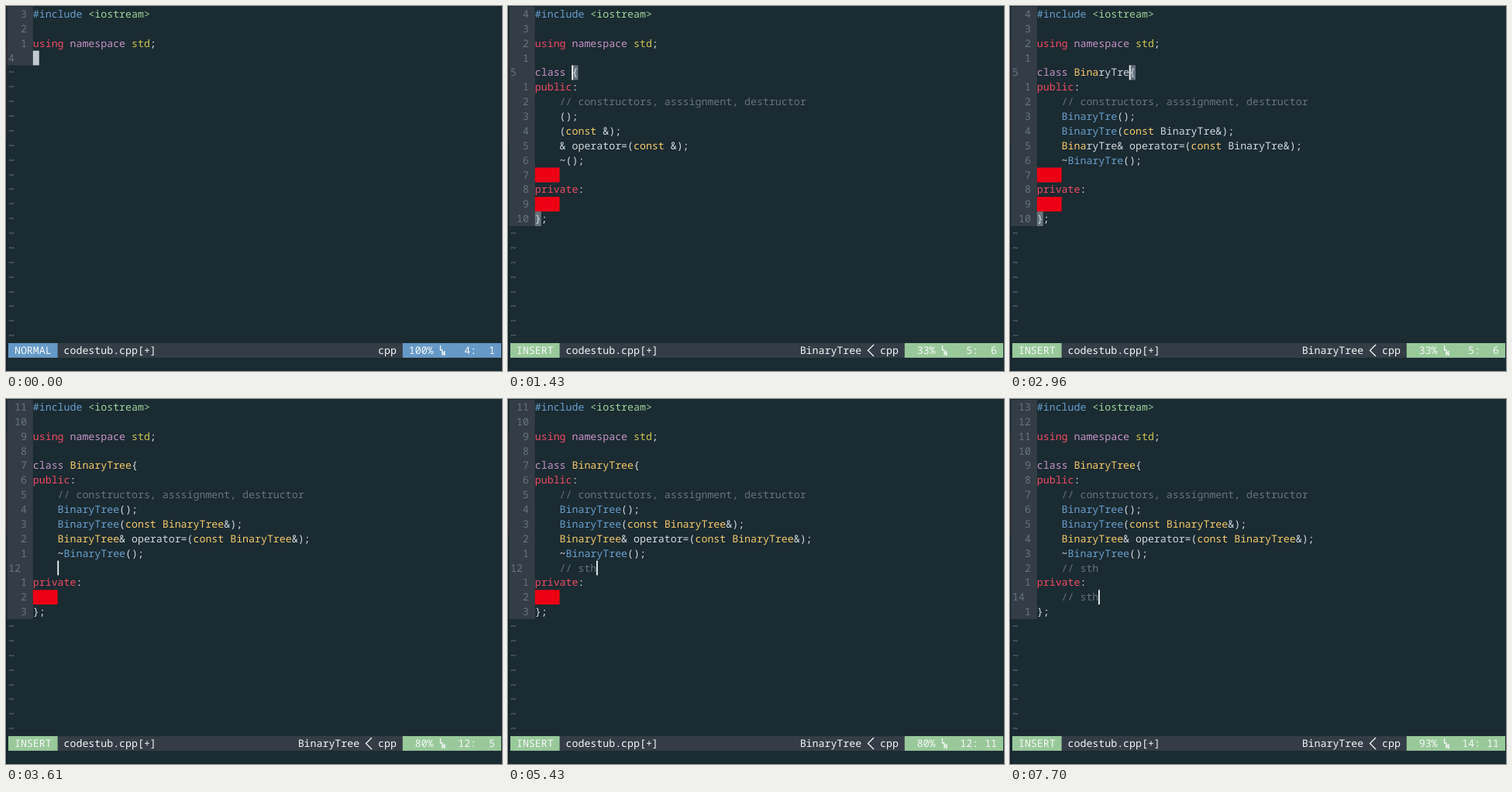
Animation of 640x471 px, one loop 7.75 s. Source, as an HTML page:

```html
<!DOCTYPE html>
<html lang="en">
<head>
<meta charset="utf-8">
<title>Snippet demo</title>
<style>
  html, body { margin: 0; width: 100%; height: 100%; overflow: hidden; background: #1b2b32; }
  svg { display: block; width: 640px; height: 471px; }
  text {
    font: 500 13.25px "Noto Sans Mono", "DejaVu Sans Mono", monospace;
    white-space: pre;
    text-rendering: geometricPrecision;
  }
</style>
</head>
<body>
<svg id="stage" viewBox="0 0 640 471"></svg>
<script>
const LOOP = 7750;
const COL = 7.95, ROW = 18.87, LEFT = 3, TOP = 1;
const GUTTER = 4, STATUS_ROW = 23;

const C = {
  bg: '#1b2b32', panel: '#343d46', dim: '#65737e', text: '#d3d9e0', white: '#f4f7f8',
  red: '#ee4b62', purple: '#c594c5', blue: '#6a9fcc', green: '#9fd39b',
  olive: '#cfc653', yellow: '#f6ca6c', alert: '#ee0014',
  normal: '#6699c6', insert: '#99c99a', cursor: '#c3c9cf'
};

// [time, phase, typed text]
const STEPS = [
  [0, 'normal', ''],
  [320, 'word', ''], [560, 'word', 'c'], [720, 'word', 'cl'],
  [910, 'word', 'cla'], [1010, 'word', 'clas'], [1110, 'word', 'class'],
  [1360, 'name', ''], [1560, 'name', 'B'], [1660, 'name', 'Bi'],
  [1770, 'name', 'Bin'], [1880, 'name', 'Bina'], [2120, 'name', 'Binar'],
  [2320, 'name', 'Binary'], [2580, 'name', 'BinaryT'], [2740, 'name', 'BinaryTr'],
  [2880, 'name', 'BinaryTre'], [3050, 'name', 'BinaryTree'],
  [3560, 'public', ''], [4400, 'public', '/'], [4560, 'public', '//'],
  [4740, 'public', '// '], [4920, 'public', '// s'], [5080, 'public', '// st'],
  [5240, 'public', '// sth'],
  [5960, 'private', ''], [6340, 'private', '/'], [6500, 'private', '//'],
  [6680, 'private', '// '], [6880, 'private', '// s'], [7060, 'private', '// st'],
  [7240, 'private', '// sth']
];

const colX = c => LEFT + c * COL;
const rowY = r => TOP + r * ROW;
const escapeText = s => s.replace(/&/g, '&amp;').replace(/</g, '&lt;');

const rect = (x, y, w, h, fill) =>
  `<rect x="${x}" y="${y}" width="${w}" height="${h}" fill="${fill}"/>`;
const cells = (row, col, count, fill) =>
  rect(colX(col), rowY(row), count * COL, ROW, fill);
const write = (row, col, s, fill) =>
  `<text x="${colX(col)}" y="${rowY(row) + 14}" fill="${fill}">${escapeText(s)}</text>`;

function writeParts(row, parts) {
  let col = GUTTER, out = '';
  for (const [s, color = 'text'] of parts) {
    if (s.trim()) out += write(row, col, s, C[color]);
    col += s.length;
  }
  return out;
}

const HEADER = [
  [['#include ', 'blue'], ['<iostream>', 'green']],
  [],
  [['using ', 'red'], ['namespace ', 'purple'], ['std', 'olive'], [';']],
  []
];

const comment = s => [['    '], [s, s.length > 1 ? 'dim' : 'text']];

// While the name is being typed, its colouring lags behind.
function classLines(name, editing, pub, priv) {
  const known = editing ? (name.length > 4 ? 4 : 0) : name.length;
  const type = [[name.slice(0, known), 'yellow'], [name.slice(known)]];
  const ref = [name, editing ? 'text' : 'yellow'];
  const fn = [name, 'blue'];
  const constant = ['const ', 'yellow'];
  return [
    [['class ', 'purple'], ...type, ['{']],
    [['public', 'red'], [':']],
    comment('// constructors, asssignment, destructor'),
    [['    '], fn, ['();']],
    [['    '], fn, ['('], constant, ref, ['&);']],
    [['    '], ...type, ['& operator=('], constant, ref, ['&);']],
    [['    ~'], fn, ['();']],
    comment(pub),
    [['private', 'red'], [':']],
    comment(priv),
    [['};']]
  ];
}

function buildState(phase, typed) {
  if (phase === 'normal') return { lines: HEADER, row: 3, col: 0, at: 1 };
  if (phase === 'word') {
    const color = typed === 'class' ? 'purple' : 'text';
    return { lines: [...HEADER, [[typed, color]]], row: 4, col: typed.length, at: typed.length + 1 };
  }
  const editing = phase === 'name', last = phase === 'private';
  const pub = editing ? '' : last ? '// sth' : typed;
  const lines = [...HEADER,
    ...classLines(editing ? typed : 'BinaryTree', editing, pub, last ? typed : '')];
  if (editing) {
    return { lines, row: 4, col: 6 + typed.length, at: 6, blanks: [11, 13], braces: true };
  }
  const col = 4 + typed.length;
  return { lines, row: last ? 13 : 11, col, at: col + 1, blanks: last ? [] : [13] };
}

function drawStatus(phase, state) {
  const normal = phase === 'normal';
  const accent = normal ? C.normal : C.insert;
  const r = STATUS_ROW, y = rowY(r), x = colX(70);
  const percent = Math.floor((state.row + 1) / state.lines.length * 100) + '%';
  let out = cells(r, 0, 80, C.panel) + cells(r, 0, 8, accent) + cells(r, 64, 16, accent);
  out += write(r, 1, normal ? 'NORMAL' : 'INSERT', C.white);
  out += write(r, 9, 'codestub.cpp[+]', C.white);
  if (!normal) {
    out += write(r, 47, 'BinaryTree', C.white);
    out += `<path d="M472 ${y + 2}L464.5 ${y + 9.5}L472 ${y + 17}" fill="none" stroke="${C.white}" stroke-width="1.3"/>`;
  }
  out += write(r, 60, 'cpp', C.white);
  out += write(r, 65, percent.padStart(4), C.white);
  // Small stacked line-number symbol
  out += `<path d="M${x + 1} ${y + 3}v6h3M${x + 3.5} ${y + 16}v-6l3 6v-6" fill="none" stroke="${C.white}" stroke-width="1.3"/>`;
  out += write(r, 73, String(state.row + 1).padStart(2) + ':', C.white);
  return out + write(r, 77, String(state.at).padStart(2), C.white);
}

function draw(phase, typed) {
  const state = buildState(phase, typed);
  const { lines, row, col, blanks = [], braces } = state;
  let out = rect(0, 0, 640, 471, C.bg);
  out += rect(0, 0, 1.5, 471, '#15222a') + rect(0, 45, 1, 130, '#38262f');
  out += rect(1.5, TOP, colX(GUTTER) - 1.5, lines.length * ROW, C.panel);

  for (const b of blanks) out += cells(b, GUTTER, 4, C.alert);
  if (braces) {
    out += cells(row, GUTTER + col, 1, C.dim);
    out += cells(lines.length - 1, GUTTER, 1, C.dim);
  }

  lines.forEach((parts, i) => {
    const label = i === row ? String(i + 1) : String(Math.abs(i - row)).padStart(3);
    out += write(i, 0, label, C.dim) + writeParts(i, parts);
  });
  for (let i = lines.length; i < STATUS_ROW; i++) out += write(i, 0, '~', C.dim);

  out += phase === 'normal'
    ? cells(row, GUTTER + col, 1, C.cursor)
    : rect(colX(GUTTER + col) - 0.3, rowY(row), 1.8, ROW, C.white);
  stage.innerHTML = out + drawStatus(phase, state);
}

const stage = document.getElementById('stage');
const start = performance.now();
let shown = -1;

function tick() {
  const t = (performance.now() - start) % LOOP;
  let i = STEPS.length - 1;
  while (STEPS[i][0] > t) i--;
  if (i !== shown) {
    shown = i;
    draw(STEPS[i][1], STEPS[i][2]);
  }
  requestAnimationFrame(tick);
}
tick();
</script>
</body>
</html>
```
